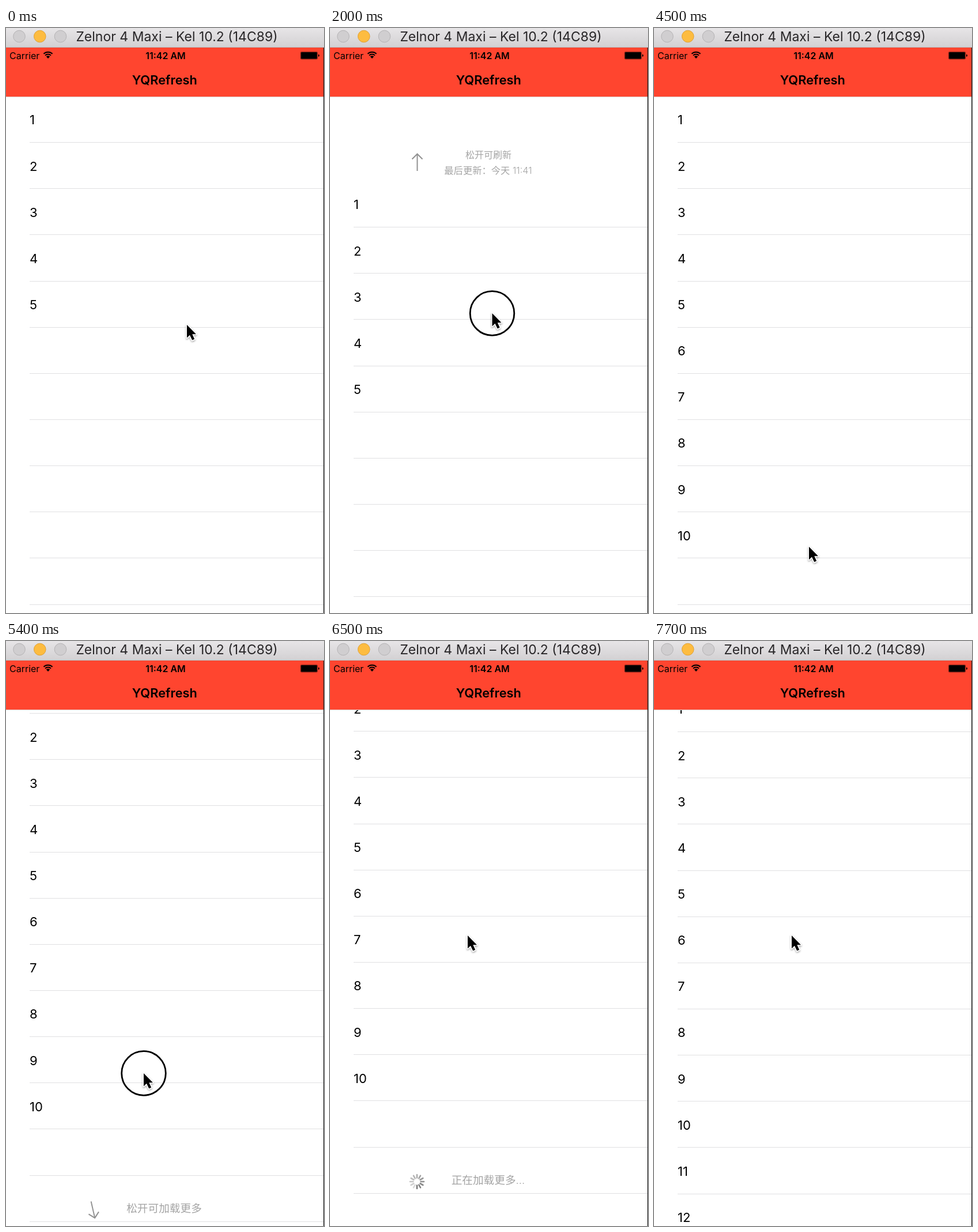
These frames come from a looping animation (552x1015 px, 8 s). An HTML page:

```html
<!DOCTYPE html>
<html lang="zh-CN">
<head>
<meta charset="utf-8">
<title>YQRefresh</title>
<style>
  html, body { margin: 0; width: 100%; height: 100%; overflow: hidden; background: #fff; }
  svg { display: block; width: 100%; height: 100%; }
  text { font-family: Inter, "Noto Sans CJK SC", "Noto Sans CJK", sans-serif; }
  .mid { text-anchor: middle; }
  .row { font-size: 22px; }
  .hint { fill: #a4a4a4; font-weight: 300; text-anchor: middle; }
  .sep { fill: #e0e0e2; shape-rendering: crispEdges; }
  .arrow { fill: none; stroke: #929292; stroke-width: 2; }
  .spinner { stroke: #777; stroke-width: 2.6; stroke-linecap: round; }
</style>
</head>
<body>
<svg viewBox="0 0 552 1015" preserveAspectRatio="none">
  <defs>
    <linearGradient id="chrome" x1="0" y1="0" x2="0" y2="1">
      <stop offset="0" stop-color="#e7e5e7"/>
      <stop offset="1" stop-color="#d2d0d2"/>
    </linearGradient>
    <clipPath id="view"><rect y="119" width="552" height="896"/></clipPath>
    <filter id="shade" x="-50%" y="-50%" width="200%" height="200%">
      <feDropShadow dx="0" dy="1.5" stdDeviation="1.5" flood-opacity=".4"/>
    </filter>
  </defs>
  <rect width="552" height="1015" fill="#fff"/>

  <g clip-path="url(#view)">
    <g id="list">
      <g id="header">
        <text class="hint" id="headHint" x="275" y="79" font-size="16"></text>
        <text class="hint" x="274.5" y="105.5" font-size="16.3">最后更新：今天 11:41</text>
        <g class="icon" transform="translate(151.5 86)"></g>
      </g>
      <g id="footer">
        <text class="hint" id="footHint" x="274.5" y="1063.5" font-size="18.67"></text>
        <g class="icon" transform="translate(151 1060)"></g>
      </g>
      <g id="rows"></g>
    </g>
  </g>

  <rect y="34" width="552" height="85" fill="#ff452f"/>
  <rect y="119" width="552" height="1" fill="#e0cfcc"/>
  <text x="6" y="53.5" font-size="16">Carrier</text>
  <g transform="translate(73 53)">
    <path d="M0 0L-3.2 -3.4A4.6 4.6 0 0 1 3.2 -3.4Z"/>
    <path d="M-5 -5.4A7 7 0 0 1 5 -5.4M-7.6 -8.2A10.8 10.8 0 0 1 7.6 -8.2" fill="none" stroke="#000" stroke-width="2"/>
  </g>
  <text class="mid" x="277" y="53.5" font-size="16" font-weight="600">11:42 AM</text>
  <rect x="511" y="41" width="30" height="13.5" rx="2" opacity=".5"/>
  <rect x="512.3" y="42.3" width="27.4" height="10.9" rx="1"/>
  <path d="M542 45.5q2 .5 2 2.3t-2 2.3z"/>
  <text class="mid" x="275.3" y="98" font-size="21.8" font-weight="600">YQRefresh</text>
  <rect x="551" y="34" width="1" height="981" fill="#111"/>

  <rect width="552" height="34" fill="url(#chrome)"/>
  <rect y="33" width="552" height="1" fill="#b9b5b7"/>
  <g stroke-width="1">
    <circle cx="23" cy="14.5" r="10.3" fill="#d0ced0" stroke="#b4b2b4"/>
    <circle cx="58.8" cy="14.5" r="10.3" fill="#fdbc40" stroke="#dfa033"/>
    <circle cx="94.5" cy="14.5" r="10.3" fill="#d0ced0" stroke="#b4b2b4"/>
  </g>
  <text class="mid" x="296.5" y="23" font-size="23" fill="#282628">Zelnor 4 Maxi – Kel 10.2 (14C89)</text>

  <g id="pointer">
    <circle id="press" r="38.3" fill="none" stroke="#000" stroke-width="2.8"/>
    <path filter="url(#shade)" d="M0 0V22.5L5 17.8L9.2 26.6L13.2 24.8L9.3 16.2H16Z"
      stroke="#fff" stroke-width="3" paint-order="stroke" stroke-linejoin="round"/>
  </g>
</svg>
<script>
const LOOP = 8000, STEP = 100, PITCH = 80.15, TOP = 118.4, VIEW = 981;
const HOLD = 70;

// time, x, y of the pointer tip
const PATH = [
  [400, 314, 515], [900, 290, 180], [1200, 290, 180], [2000, 281.5, 495],
  [2100, 281.5, 495], [2900, 298, 718], [4000, 298, 718], [4500, 269, 900],
  [4800, 269, 900], [5800, 219, 650], [6200, 239, 511]
];
const DRAGS = [
  { from: 1250, to: 2150, y: 180 },
  { from: 4850, to: 6350, y: 894 }
];
// time, list offset outside the drags
const SCROLL = [
  [2150, 147], [2450, HOLD], [2800, HOLD], [3000, 0],
  [6350, 0], [6350, -174], [6650, -HOLD], [7000, -HOLD], [7200, 0],
  [7400, 0], [7700, -40.8]
];

const $ = id => document.getElementById(id);
const clamp = v => Math.max(0, Math.min(1, v));
const linear = v => v;
const smooth = v => v * v * (3 - 2 * v);

function track(keys, t, ease) {
  const i = keys.findIndex(k => k[0] > t);
  if (i === 0) return keys[0].slice(1);
  if (i < 0) return keys[keys.length - 1].slice(1);
  const a = keys[i - 1], b = keys[i];
  const p = ease((t - a[0]) / (b[0] - a[0]));
  return a.slice(1).map((v, n) => v + (b[n + 1] - v) * p);
}

// Resistance of a list pulled past its edge
function rubber(d) {
  return Math.sign(d) * VIEW * (1 - 1 / (Math.abs(d) * 0.55 / VIEW + 1));
}

let rowMarkup = '';
for (let i = 0; i < 15; i++) {
  const y = TOP + PITCH * i;
  rowMarkup += `<text class="row" x="41" y="${y + 49}">${i + 1}</text>` +
    `<rect class="sep" x="41" y="${Math.round(y + PITCH - 0.5)}" width="510" height="1"/>`;
}
$('rows').innerHTML = rowMarkup;
const labels = [...document.querySelectorAll('.row')];

let spokes = '';
for (let i = 0; i < 12; i++) {
  spokes += `<path d="M0 -6.5V-12" transform="rotate(${i * 30})"/>`;
}
for (const icon of document.querySelectorAll('.icon')) {
  icon.innerHTML = '<path class="arrow" d="M0 15V-15M-9 -5.5L0 -14.5L9 -5.5"/>' +
    `<g class="spinner">${spokes}</g>`;
}

function drawIcon(box, busy, angle, t) {
  const arrow = box.querySelector('.arrow'), spinner = box.querySelector('.spinner');
  arrow.style.display = busy ? 'none' : '';
  spinner.style.display = busy ? '' : 'none';
  arrow.setAttribute('transform', `rotate(${angle})`);
  const lead = Math.floor(t / 83) % 12;
  [...spinner.children].forEach((s, i) => {
    s.setAttribute('opacity', 1 - 0.72 * ((lead - i + 12) % 12) / 11);
  });
}

function draw(t) {
  const [x, y] = track(PATH, t, t > 4800 ? linear : smooth);
  const drag = DRAGS.find(d => t >= d.from && t < d.to);
  let offset = 0;
  if (drag) offset = rubber(Math.sign(y - drag.y) === Math.sign(495 - drag.y) ? y - drag.y : 0);
  else if (t >= 2150) offset = track(SCROLL, t, smooth)[0];

  $('list').setAttribute('transform', `translate(0 ${Math.round(offset)})`);
  $('pointer').setAttribute('transform', `translate(${x} ${y})`);
  $('press').style.display = drag ? '' : 'none';

  const count = t < 3400 ? 5 : t < 7400 ? 10 : 15;
  labels.forEach((el, i) => { el.style.display = i < count ? '' : 'none'; });

  const turn = 180 * clamp((Math.abs(offset) - 64) / 10);
  const ready = turn > 90;
  const refreshing = t >= 2150 && t < 3100, loading = t >= 6350;
  $('header').style.display = offset > 0 ? '' : 'none';
  $('footer').style.display = offset < 0 && t < 7300 ? '' : 'none';
  $('headHint').textContent = refreshing ? '正在刷新...' : ready ? '松开可刷新' : '下拉可刷新';
  $('footHint').textContent = loading ? '正在加载更多...' : ready ? '松开可加载更多' : '上拉可加载更多';
  drawIcon($('header').querySelector('.icon'), refreshing, 180 + turn, t);
  drawIcon($('footer').querySelector('.icon'), loading, turn, t);
}

const start = performance.now();
function tick() {
  const t = (performance.now() - start) % LOOP;
  draw(Math.floor(t / STEP) * STEP);
  requestAnimationFrame(tick);
}
tick();
</script>
</body>
</html>
```
